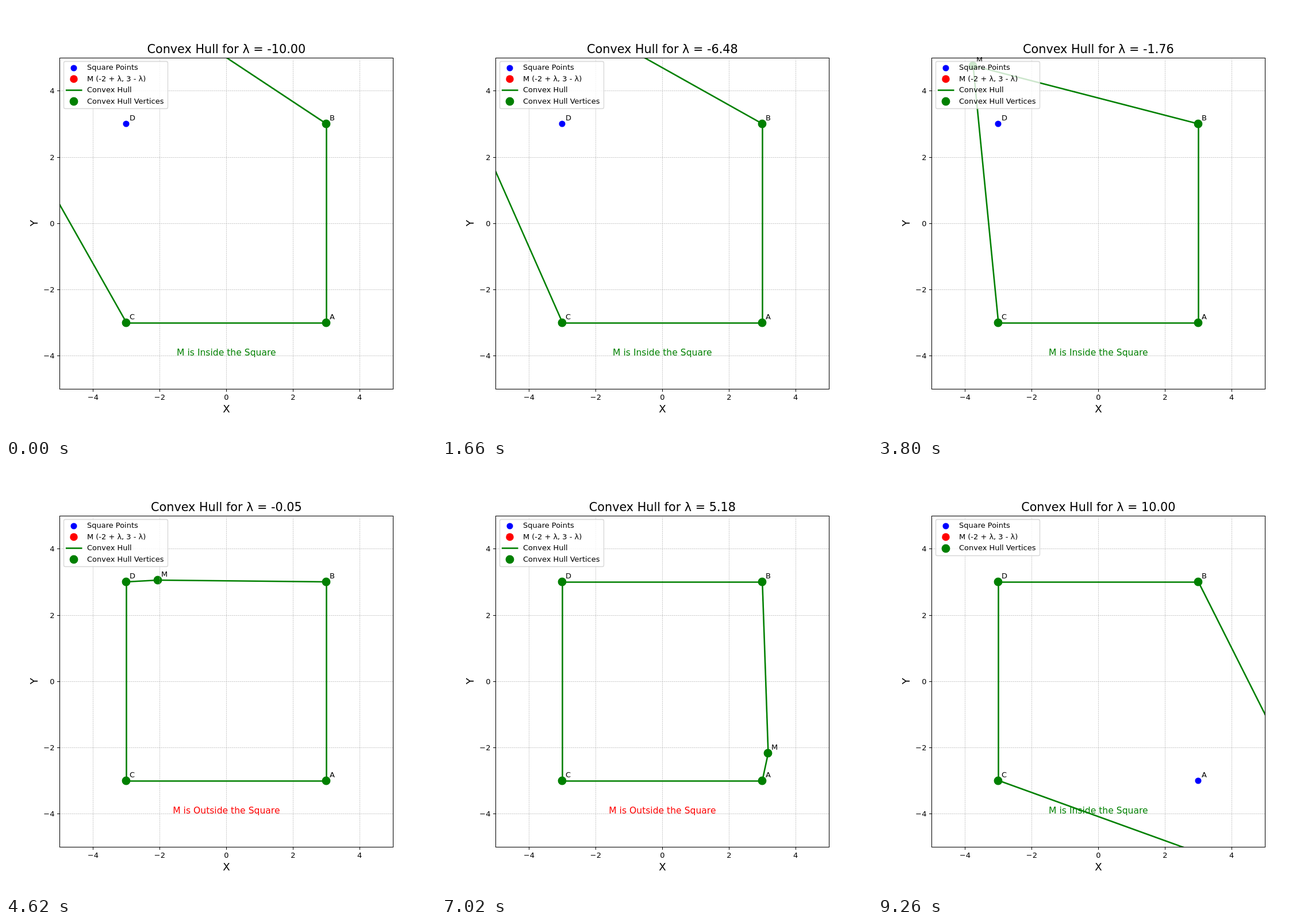
An HTML page with a canvas for the animation above (9280 ms loop, 748 by 748 pixels).

```html
<!DOCTYPE html>
<html>
<head>
<meta charset="utf-8">
<title>Convex hull</title>
<style>
html, body { margin: 0; width: 100%; height: 100%; overflow: hidden; background: #fff; }
canvas { display: block; }
</style>
</head>
<body>
<canvas id="c" width="748" height="748"></canvas>
<script>
const SIZE = 748, LOOP = 9280, STEPS = 199;
const PT = SIZE / 8 / 72;                       // pixels per typographic point
const LEFT = SIZE * .125, RIGHT = SIZE * .9, TOP = SIZE * .12, BOTTOM = SIZE * .89;
const GREEN = '#008000', TICKS = [-4, -2, 0, 2, 4];
const A = [3, -3], B = [3, 3], C = [-3, -3], D = [-3, 3];
const ctx = document.getElementById('c').getContext('2d');

const px = x => LEFT + (x + 5) / 10 * (RIGHT - LEFT);
const py = y => BOTTOM - (y + 5) / 10 * (BOTTOM - TOP);
const snap = v => Math.round(v - .01) + .5;

function text(str, x, y, pt = 10, align = 'left', color = '#000') {
  ctx.font = `${pt * PT}px "DejaVu Sans", sans-serif`;
  ctx.textAlign = align;
  ctx.fillStyle = color;
  ctx.fillText(str, x, y);
}

function line(x1, y1, x2, y2, color, pt) {
  ctx.strokeStyle = color;
  ctx.lineWidth = pt * PT;
  ctx.beginPath();
  ctx.moveTo(x1, y1);
  ctx.lineTo(x2, y2);
  ctx.stroke();
}

// area is in square points; the outline adds 0.75 pt to the radius
function dot(x, y, area, color) {
  ctx.fillStyle = color;
  ctx.beginPath();
  ctx.arc(Math.round(x), Math.round(y), (Math.sqrt(area) / 2 + .75) * PT, 0, 7);
  ctx.fill();
}

function edge(p, q) {
  const flat = p[0] === q[0] || p[1] === q[1];
  const fit = flat ? snap : v => v;
  line(fit(px(p[0])), fit(py(p[1])), fit(px(q[0])), fit(py(q[1])), GREEN, 2);
}

function grid() {
  ctx.setLineDash([3.7 * .5 * PT, 1.6 * .5 * PT]);
  for (const v of TICKS) {
    line(snap(px(v)), BOTTOM, snap(px(v)), TOP, '#b0b0b0', .5);
    line(LEFT, snap(py(v)), RIGHT, snap(py(v)), '#b0b0b0', .5);
  }
  ctx.setLineDash([]);
}

function axes() {
  const l = snap(LEFT), r = snap(RIGHT), t = snap(TOP), b = snap(BOTTOM);
  ctx.strokeStyle = '#000';
  ctx.lineWidth = .8 * PT;
  ctx.strokeRect(l, t, r - l, b - t);
  for (const v of TICKS) {
    const name = String(v).replace('-', '\u2212');
    line(snap(px(v)), b, snap(px(v)), b + 3.5 * PT, '#000', .8);
    line(l, snap(py(v)), l - 3.5 * PT, snap(py(v)), '#000', .8);
    text(name, px(v), 685, 10, 'center');
    text(name, LEFT - 7 * PT, Math.round(py(v) + 5), 10, 'right');
  }
  text('X', px(0), 707, 14, 'center');
  ctx.save();
  ctx.translate(55, py(0));
  ctx.rotate(-Math.PI / 2);
  text('Y', 0, 0, 14, 'center');
  ctx.restore();
}

function legend(withLine) {
  const rows = [['Square Points', 50, '#00f'], ['M (-2 + λ, 3 - λ)', 80, '#f00']];
  if (withLine) rows.push(['Convex Hull', 0, GREEN]);
  rows.push(['Convex Hull Vertices', 100, GREEN]);
  ctx.beginPath();
  ctx.roundRect(100.5, 96.5, 181, withLine ? 82 : 63, 2.6);
  ctx.fillStyle = 'rgba(255,255,255,.8)';
  ctx.fill();
  ctx.strokeStyle = 'rgba(204,204,204,.8)';
  ctx.lineWidth = PT;
  ctx.stroke();
  rows.forEach(([name, area, color], i) => {
    const base = 111.4 + 19.48 * i;
    if (area) dot(118.2, base - 3.45, area, color);
    else line(103.9, 146.5, 132.5, 146.5, color, 2);
    text(name, 141, Math.round(base));
  });
}

function draw(lambda) {
  const M = [lambda - 2, 3 - lambda];
  const hull = [];
  if (lambda >= -1) hull.push(D);
  if (lambda < 0) hull.push(M);
  hull.push(B);
  if (lambda > 5) hull.push(M);
  if (lambda <= 6) hull.push(A);
  hull.push(C);

  ctx.fillStyle = '#fff';
  ctx.fillRect(0, 0, SIZE, SIZE);

  ctx.save();
  ctx.beginPath();
  ctx.rect(94, 90, 579, 576);
  ctx.clip();
  const mark = (p, area, color) => dot(px(p[0]), py(p[1]), area, color);
  for (const p of [A, B, C, D]) mark(p, 50, '#00f');
  mark(M, 80, '#f00');
  for (const p of hull) mark(p, 100, GREEN);
  grid();
  hull.forEach((p, i) => edge(p, hull[(i + 1) % hull.length]));
  ctx.restore();

  axes();
  for (const [name, p] of Object.entries({ A, B, C, D, M })) {
    const x = p[0] + .1, y = p[1] + .1;
    if (Math.max(Math.abs(x), Math.abs(y)) <= 5)
      text(name, Math.round(px(x)), Math.round(py(y)));
  }
  const outside = hull.length === 5;
  text(`M is ${outside ? 'Outside' : 'Inside'} the Square`, px(0), 608, 12, 'center',
    outside ? '#f00' : GREEN);
  text('Convex Hull for λ = ' + lambda.toFixed(2), px(0), 82, 16, 'center');
  legend(hull.includes(A));
}

// every 140 ms holds three steps lasting 20, 100 and 20 ms
function stepAt(t) {
  const r = t % 140;
  return 3 * Math.floor(t / 140) + (r >= 20) + (r >= 120);
}

const start = performance.now();
function tick() {
  const t = Math.max(0, performance.now() - start) % LOOP;
  draw(-10 + 20 * stepAt(t) / STEPS);
  requestAnimationFrame(tick);
}
tick();
</script>
</body>
</html>
```
